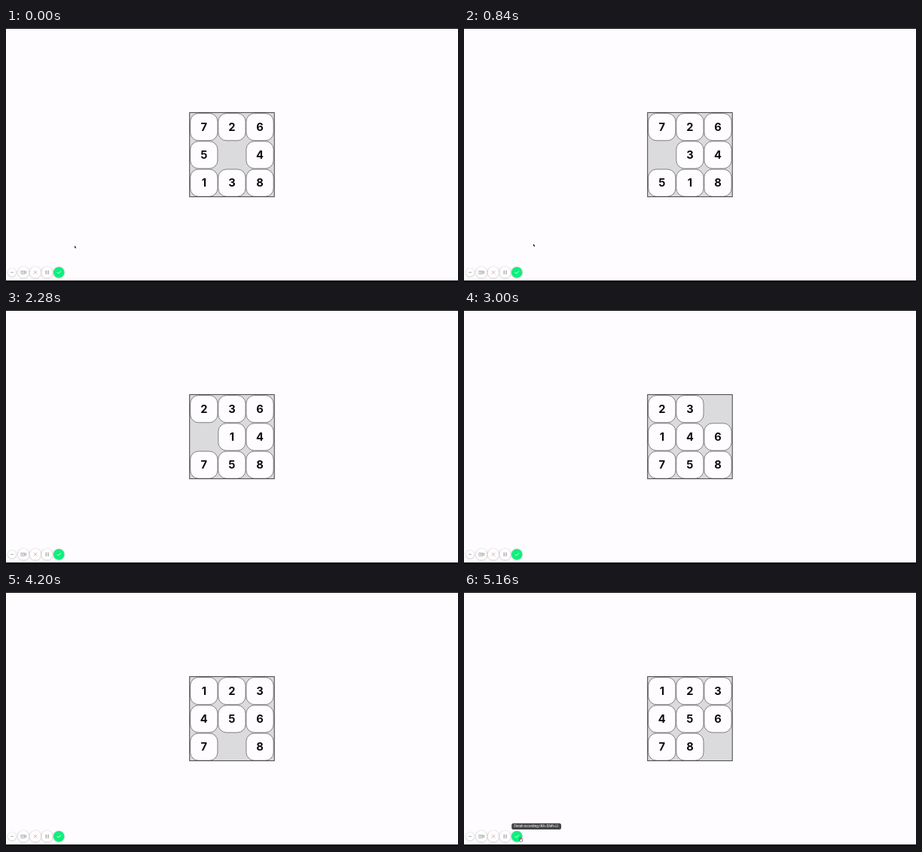
An HTML page with a canvas for the animation above (5220 ms loop, 600x338 px).

```html
<!DOCTYPE html>
<html lang="en">
<head>
<meta charset="utf-8">
<title>Sliding puzzle</title>
<style>
html, body { margin: 0; width: 100%; height: 100%; overflow: hidden; background: #fefcff; }
canvas { display: block; width: 600px; height: 338px; }
</style>
</head>
<body>
<canvas id="stage"></canvas>
<script>
const LOOP = 5220, TICK = 60;
const PAPER = '#fefcff', ICON = '#999';
const BAR_Y = 325.2;

const canvas = document.getElementById('stage');
const ratio = window.devicePixelRatio || 1;
canvas.width = 600 * ratio;
canvas.height = 338 * ratio;
const ctx = canvas.getContext('2d');
ctx.scale(ratio, ratio);

// Each character is one tick; a letter slides the gap up, down, left or right.
const script = '.....D...L....U..U...R....D...D..L....U...R...R...U...L...L...D...R...D...R';
const steps = { U: -3, D: 3, L: -1, R: 1 };

function boardAt(tick) {
  const cells = [...'726504138'];
  let gap = cells.indexOf('0');
  for (const key of script.slice(0, tick + 1)) {
    if (key === '.') continue;
    const next = gap + steps[key];
    [cells[gap], cells[next]] = [cells[next], cells[gap]];
    gap = next;
  }
  return cells;
}

function roundBox(x, y, w, h, r, fill, stroke) {
  ctx.beginPath();
  ctx.roundRect(x, y, w, h, r);
  ctx.fillStyle = fill;
  ctx.fill();
  if (stroke) {
    ctx.strokeStyle = stroke;
    ctx.stroke();
  }
}

function line(color, width, ...points) {
  ctx.beginPath();
  points.forEach(([x, y]) => ctx.lineTo(x, y));
  ctx.strokeStyle = color;
  ctx.lineWidth = width;
  ctx.stroke();
}

function disc(x, y, r) {
  ctx.beginPath();
  ctx.arc(x, y, r, 0, Math.PI * 2);
}

function text(str, x, y, font, color) {
  ctx.font = font;
  ctx.fillStyle = color;
  ctx.textAlign = 'center';
  ctx.fillText(str, x, y);
}

function drawBoard(cells) {
  ctx.fillStyle = '#dbdadc';
  ctx.fillRect(243.5, 112.5, 113, 112);
  cells.forEach((n, i) => {
    if (n === '0') return;
    const cx = 262.8 + 37.1 * (i % 3), cy = 131.7 + 37.2 * Math.floor(i / 3);
    ctx.lineWidth = 0.75;
    roundBox(cx - 18.1, cy - 18.1, 36.2, 36.2, 10.8, PAPER, '#5a5a5a');
    text(n, cx, cy + 5.3, '700 14.6px Inter, sans-serif', '#0a0a0a');
  });
  ctx.strokeStyle = '#444';
  ctx.lineWidth = 1;
  ctx.strokeRect(243.7, 112.6, 112.5, 112);
}

function button(x, r, color) {
  ctx.save();
  ctx.shadowColor = 'rgba(0,0,0,.3)';
  ctx.shadowBlur = 2.5 * ratio;
  ctx.shadowOffsetY = 0.4 * ratio;
  disc(x, BAR_Y, r);
  ctx.fillStyle = color;
  ctx.fill();
  ctx.restore();
}

function drawToolbar() {
  button(8, 5.2, '#fff');
  line(ICON, 0.8, [5.8, BAR_Y], [10.2, BAR_Y]);

  button(23.2, 7.4, '#fff');
  ctx.strokeStyle = ICON;
  ctx.lineWidth = 0.7;
  ctx.strokeRect(19.9, BAR_Y - 2, 4.8, 4);
  disc(22.3, BAR_Y, 0.8);
  ctx.stroke();
  line(ICON, 0.7, [24.7, BAR_Y], [26.7, BAR_Y - 1.8], [26.7, BAR_Y + 1.8], [24.7, BAR_Y]);

  button(39, 7.4, '#fff');
  for (const d of [-2.4, 2.4]) line('#f09498', 0.8, [39 - d, BAR_Y - 2.4], [39 + d, BAR_Y + 2.4]);

  button(54.6, 7.4, '#fff');
  for (const d of [-1.4, 1.4]) line('#777', 0.9, [54.6 + d, BAR_Y - 2.6], [54.6 + d, BAR_Y + 2.6]);

  button(70.2, 7.2, '#10ee7e');
  line('#fff', 1, [67.8, BAR_Y], [69.5, BAR_Y + 1.7], [72.8, BAR_Y - 1.7]);
}

function drawArrow(x, y) {
  ctx.beginPath();
  ctx.moveTo(x, y);
  ctx.lineTo(x, y + 3.2);
  ctx.lineTo(x + 2.2, y + 2.3);
  ctx.fillStyle = '#222';
  ctx.fill();
  line('#222', 0.7, [x + 0.9, y + 2], [x + 1.7, y + 3.8]);
}

function drawHand(x, y) {
  ctx.lineWidth = 0.6;
  roundBox(x - 1.5, y - 0.6, 4.2, 3.6, 1, '#fff', '#333');
  roundBox(x - 0.9, y - 2.6, 1.2, 3.4, 0.6, '#fff', '#333');
}

const progress = (tick, from, count) => Math.min(1, (tick - from) / count);

function drawPointer(tick) {
  if (tick < 23) {
    const p = progress(tick, 0, 5);
    drawArrow(91 + p, 289.6 - 2.4 * p);
  } else if (tick >= 81) {
    const p = progress(tick, 81, 3);
    if (p < 1) drawArrow(90 - 15 * p, 296 + 33 * p);
    else drawHand(75, 329);
  }
}

function drawTip() {
  roundBox(63.2, 307.7, 65.8, 8.4, 2.6, '#444345');
  text('Finish recording (Alt+Shift+L)', 96, 313.4, '500 4.2px Inter, sans-serif', '#fff');
}

function draw(tick) {
  ctx.fillStyle = PAPER;
  ctx.fillRect(0, 0, 600, 338);
  ctx.fillStyle = '#000';
  ctx.fillRect(0, 0, 600, 1);
  ctx.fillRect(0, 336, 600, 2);
  drawBoard(boardAt(tick));
  drawToolbar();
  if (tick >= 85) drawTip();
  drawPointer(tick);
}

const begin = performance.now();
function frame() {
  draw(Math.floor((performance.now() - begin) % LOOP / TICK));
  requestAnimationFrame(frame);
}
frame();
</script>
</body>
</html>
```
